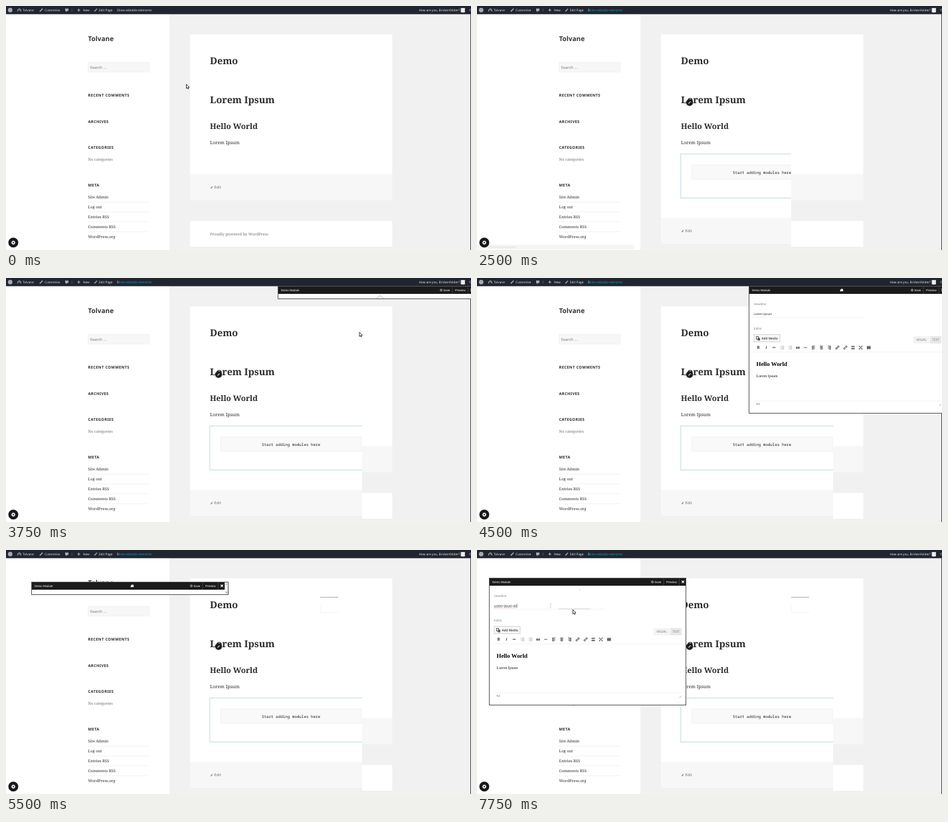
Animation of 700 by 369 pixels, one loop 8000 ms. Source, as an HTML page with a canvas:

```html
<!DOCTYPE html>
<html lang="en">
<head>
<meta charset="utf-8">
<title>Inline module editing</title>
<style>
html, body { margin: 0; width: 100%; height: 100%; overflow: hidden; background: #f1f1f1; }
canvas { display: block; width: 700px; height: 369px; }
</style>
</head>
<body>
<canvas id="stage"></canvas>
<script>
const stage = document.getElementById('stage');
const dpr = window.devicePixelRatio || 1;
stage.width = 700 * dpr;
stage.height = 369 * dpr;
const c = stage.getContext('2d');
c.scale(dpr, dpr);

const SERIF = '"Noto Serif", serif', SANS = '"Noto Sans", sans-serif';
const OPEN = '"Open Sans", sans-serif', ARIAL = '"Liberation Sans", sans-serif';
const TIMES = '"Liberation Serif", serif', MONO = '"Noto Sans Mono", monospace';

function box(x, y, w, h, fill) {
  c.fillStyle = fill;
  c.fillRect(x, y, w, h);
}
function frame(x, y, w, h, color, dash = [], width = 1) {
  c.strokeStyle = color;
  c.lineWidth = width;
  c.setLineDash(dash);
  c.strokeRect(x, y, w, h);
  c.setLineDash([]);
}
function line(points, color, width = 1, dash = []) {
  c.strokeStyle = color;
  c.lineWidth = width;
  c.setLineDash(dash);
  c.beginPath();
  for (let i = 0; i < points.length; i += 2) c.lineTo(points[i], points[i + 1]);
  c.stroke();
  c.setLineDash([]);
}
function poly(points, fill, stroke) {
  c.beginPath();
  for (let i = 0; i < points.length; i += 2) c.lineTo(points[i], points[i + 1]);
  c.closePath();
  c.fillStyle = fill;
  c.fill();
  if (stroke) {
    c.strokeStyle = stroke;
    c.lineWidth = 0.8;
    c.stroke();
  }
}
function dot(x, y, r, fill) {
  c.fillStyle = fill;
  c.beginPath();
  c.arc(x, y, r, 0, 7);
  c.fill();
}
// y is the middle of the capitals
function text(s, x, y, size, font, color, weight = '', align = 'left', gap = 0) {
  c.font = `${weight} ${size}px ${font}`;
  c.textRendering = 'geometricPrecision';
  c.letterSpacing = gap + 'px';
  c.textAlign = align;
  c.fillStyle = color;
  c.fillText(s, x, y + size * 0.36);
}
function pencil(x, y, color, s = 1) {
  line([x - 2 * s, y + 2 * s, x + 2 * s, y - 2 * s], color, 1.5 * s);
}

function toolbar(active) {
  const ink = '#f0f1f3', icon = '#a5a9b0';
  const label = (s, x) => text(s, x, 6.2, 4.74, OPEN, ink);
  box(0, 0, 700, 12.4, '#21252f');
  dot(6.3, 6.2, 3.4, icon);
  c.strokeStyle = icon;
  c.lineWidth = 1.2;
  c.beginPath();
  c.arc(20, 7, 2.4, 2.6, 6.8);
  c.stroke();
  line([20, 7.5, 21.5, 5], icon, 0.8);
  label('Tolvane', 25);
  pencil(53, 6.2, icon, 1.1);
  label('Customise', 58);
  box(89, 3.8, 5, 3.8, icon);
  poly([90, 7, 92.5, 7, 90, 9.3], icon);
  text('0', 98, 6.2, 4.74, OPEN, '#777d82');
  line([107.3, 6.2, 111.7, 6.2], icon, 1.1);
  line([109.5, 4, 109.5, 8.4], icon, 1.1);
  label('New', 116);
  pencil(135, 6.2, icon);
  label('Edit Page', 140);
  text('Show editable elements', 167, 6.2, 4.74, OPEN, active ? '#12a5ca' : ink);
  if (active) text('S', 167, 6.2, 4.74, OPEN, ink);
  text('How are you, Brickenfolder?', 683, 6.2, 4.74, OPEN, ink, '', 'right');
  box(684.5, 3, 6.5, 6.5, '#d5d7d9');
  dot(687.7, 5.2, 1.4, '#fff');
  box(685.5, 7.2, 4.5, 2.3, '#fff');
  line([699.5, 4, 697.5, 6, 699.5, 8], icon, 0.9);
}

function sidebar() {
  box(0, 12, 246, 357, '#fff');
  text('Tolvane', 123.5, 49, 10, SANS, '#333', 'bold');
  box(123.5, 85, 92, 15, '#f7f7f7');
  frame(123.5, 85.5, 92, 14.5, '#e0e0e0', [1, 1], 0.6);
  text('Search …', 126.5, 92.7, 5.83, SANS, '#777');
  const heads = { 'RECENT COMMENTS': 135.3, ARCHIVES: 174.7, CATEGORIES: 214.2, META: 271.3 };
  for (const h in heads) text(h, 123.5, heads[h], 5.83, SANS, '#2c2c2c', 'bold', 'left', 0.32);
  text('No categories', 123.5, 232, 5.8, SERIF, '#707070');
  ['Site Admin', 'Log out', 'Entries RSS', 'Comments RSS', 'WordPress.org'].forEach((s, i) => {
    text(s, 123.5, 289.2 + i * 14.95, 5.87, SERIF, '#2c2c2c');
    if (i) line([123.5, 281.6 + i * 14.95, 215.5, 281.6 + i * 14.95], '#dedede', 0.6, [2, 1]);
  });
}

function footer(y) {
  box(277, y, 304.5, 39, '#f7f7f7');
  line([277, y, 581.5, y], '#ececec', 0.6, [2, 1]);
  pencil(309.6, y + 19.5, '#707070', 0.7);
  text('Edit', 313.5, y + 19.3, 5.7, SANS, '#707070');
}

function article() {
  box(246, 12, 454, 357, '#f1f1f1');
  box(277, 43, 304.5, 212, '#fff');
  footer(255);
  box(277, 325, 304.5, 39, '#fff');
  text('Proudly powered by WordPress', 307, 344.7, 5.83, SERIF, '#707070');
  text('Demo', 307, 82.6, 14.35, SERIF, '#2c2c2c', 'bold');
  text('Lorem Ipsum', 307, 142, 14.35, SERIF, '#2c2c2c', 'bold');
  text('Hello World', 307, 182, 11.75, SERIF, '#2c2c2c', 'bold');
  text('Lorem Ipsum', 307, 206.6, 6.95, SERIF, '#2c2c2c');
}

// the editable layout, painted only as far as x = edge
function editable(edge) {
  c.save();
  c.beginPath();
  c.rect(246, 214, edge - 246, 155);
  c.clip();
  box(246, 214, 454, 155, '#f1f1f1');
  box(277, 214, 304.5, 108, '#fff');
  frame(306.8, 223.8, 244, 66.5, '#74b4bd', [1.4, 0.9], 0.8);
  box(323.5, 240.5, 212, 21.5, '#f9f9f9');
  frame(323.5, 240.5, 211.5, 21.5, '#dcdcdc', [1, 1], 0.7);
  text('Start adding modules here', 429, 251.4, 5.88, MONO, '#222', '', 'center');
  footer(321);
  c.restore();
  c.save();
  c.shadowColor = '#0006';
  c.shadowBlur = 3;
  dot(320, 146, 5, '#1c1c1c');
  c.restore();
  pencil(320, 146, '#ddd', 0.8);
}

function gear() {
  dot(11, 357.8, 7.5, '#191919');
  for (let i = 0; i < 8; i++) {
    const a = i * Math.PI / 4;
    line([11, 357.8, 11 + 3.1 * Math.cos(a), 357.8 + 3.1 * Math.sin(a)], '#fff', 1.2);
  }
  dot(11, 357.8, 2.3, '#fff');
  dot(11, 357.8, 1.1, '#191919');
}

function header(bar) {
  const d = bar ? -5 : 0;
  box(0, 0, 296 + d, 11.5, '#1b1b1b');
  text('Demo Module', 4.5, 5.8, 4.4, ARIAL, '#fff');
  c.strokeStyle = '#fff';
  c.lineWidth = 0.7;
  c.beginPath();
  c.arc(245.5 + d, 5.8, 1.4, 0, 7);
  c.stroke();
  text('Save', 248.8 + d, 5.8, 4.4, ARIAL, '#fff');
  text('Preview', 266.5 + d, 5.8, 4.4, ARIAL, '#fff');
  for (const x of [262.5, 286]) line([x + d, 0, x + d, 11.5], '#555', 0.6);
  line([289.8 + d, 4, 293.2 + d, 7.4], '#fff', 1.1);
  line([293.2 + d, 4, 289.8 + d, 7.4], '#fff', 1.1);
}

function icons(y) {
  const ink = '#444', bar = (x, w, dy, col = ink) => box(x - w / 2, y + dy - 0.45, w, 0.9, col);
  text('B', 14, y, 6, OPEN, ink, 'bold', 'center');
  text('I', 26, y, 6, TIMES, ink, 'italic bold', 'center');
  bar(37.5, 5, 0);
  bar(37.5, 3, -1, '#999');
  for (const x of [50, 62]) for (const dy of [-2, 0, 2]) {
    bar(x + 1, 3.4, dy, '#aaa');
    bar(x - 2, 1, dy, '#aaa');
  }
  for (const x of [72, 75]) {
    dot(x, y + 0.6, 1.2, ink);
    line([x - 0.8, y + 0.6, x + 0.6, y - 2], ink, 0.9);
  }
  bar(85, 4.5, 0);
  [97, 109, 121].forEach((x, i) => [-2.2, -0.7, 0.8, 2.3].forEach((dy, j) => {
    const w = j % 2 ? 3.2 : 5;
    bar(x + (i - 1) * (5 - w) / 2, w, dy);
  }));
  for (const x of [133, 145]) {
    line([x - 1, y + 1, x + 1, y - 1], ink, 0.9);
    for (const s of [-1, 1]) {
      c.beginPath();
      c.arc(x + s * 1.4, y - s * 1.4, 1.2, 0, 7);
      c.stroke();
    }
  }
  line([143, y - 2, 147, y + 2], '#fff', 0.8);
  bar(156.5, 5, -2);
  bar(156.5, 5, -1.2);
  bar(156.5, 5, 2);
  bar(156.5, 5, 1.2);
  for (const s of [-1, 1]) {
    line([165.8, y - s * 2.3, 170.2, y + s * 2.3], ink, 0.9);
    dot(168 + s * 2, y - 2, 0.8, ink);
    dot(168 + s * 2, y + 2, 0.8, ink);
  }
  box(177.5, y - 2.5, 5.5, 5, '#888');
  line([177.5, y, 183, y], ink, 3, [1, 0.7]);
}

function form(typed, caret) {
  const rule = (x, y, w) => line([x, y, x + w, y], '#d8d8d8', 0.6, [1, 1]);
  text('Headline', 7, 26.5, 4.74, ARIAL, '#888');
  text('Lorem Ipsum' + typed, 7, 41.7, 4.74, ARIAL, '#333');
  if (caret) {
    const end = 7 + c.measureText('Lorem Ipsum' + typed).width;
    line([end + 0.5, 39, end + 0.5, 44.5], '#333', 0.6);
    line([7, 44.6, 20.5, 44.6], '#e04848', 0.8, [1, 0.5]);
    line([22.5, 44.6, 35, 44.6], '#e04848', 0.8, [1, 0.5]);
    if (typed.length > 1) line([36.5, 44.6, end, 44.6], '#e04848', 0.8, [1, 0.5]);
  }
  rule(7, 47, 168);
  text('Editor', 7, 63.5, 4.74, ARIAL, '#888');
  box(7, 73, 40, 11, '#f7f7f7');
  frame(7.5, 73, 39, 11, '#ccc', [], 0.8);
  frame(11, 76, 3, 4, '#555', [], 0.9);
  box(13, 78, 3.5, 4, '#555');
  text('Add Media', 19, 78.7, 4.74, OPEN, '#333', '600');
  box(247.5, 75.5, 24.5, 11, '#f3f3f3');
  box(272.5, 75.5, 17, 11, '#e8e8e8');
  text('VISUAL', 259.5, 80.8, 4.74, OPEN, '#666', '', 'center');
  text('TEXT', 281.2, 80.8, 4.74, OPEN, '#777', '', 'center');
  icons(92.7);
  rule(7, 99.5, 283);
  text('Hello World', 11, 117.3, 8.9, TIMES, '#000', 'bold');
  text('Lorem Ipsum', 11, 135.6, 5.95, TIMES, '#111');
  rule(7, 173.5, 283);
  text('h2', 11, 177.6, 4.4, OPEN, '#444');
  line([286, 181, 289, 178], '#999', 0.6);
  line([287.7, 181, 289, 179.7], '#999', 0.6);
}

// x, y name the pixel of the top left corner
function panel(x, y, open, bar, typed, caret) {
  const h = open ? 192 : 19;
  c.save();
  c.translate(x + 0.5, y + 0.5);
  box(0, 0, 296, h, '#fff');
  header(bar);
  if (open) form(typed, caret);
  else if (bar) {
    box(291, 0, 5, h, '#f1f1f1');
    poly([292.3, 3.5, 294.7, 3.5, 293.5, 2], '#666');
    poly([292.3, 15, 294.7, 15, 293.5, 16.5], '#444');
  } else line([148.5, 18.5, 154, 14, 159.5, 18.5], '#aaa', 0.8);
  frame(0, 0, 296, h, '#555');
  c.restore();
}

const shapes = {
  arrow: [0, 0, 0, 6.4, 1.4, 5.1, 2.4, 7.2, 3.5, 6.7, 2.6, 4.7, 4.5, 4.7],
  hand: [-1, -3, 0.3, -3, 0.4, -0.4, 2.6, 0, 3, 1.2, 2.4, 4, -1, 4, -2.8, 1, -1, 1.2],
  grab: [-2.6, 0, -1.6, -0.8, -1, -2, 1.2, -2, 2.4, -1, 2.8, 2.4, -2.2, 2.4, -3, 1.2]
};
function pointer(kind, x, y) {
  if (kind === 'beam') {
    line([x - 1.5, y - 3.5, x, y - 3, x, y + 3, x - 1.5, y + 3.5], '#333', 0.7);
    line([x + 1.5, y - 3.5, x, y - 3, x, y + 3, x + 1.5, y + 3.5], '#333', 0.7);
    return;
  }
  poly(shapes[kind].map((v, i) => v + (i % 2 ? y : x)), '#fff', '#111');
}

// [first step, shape, x, y]
const moves = [
  [0, 'arrow', 271.5, 118.3], [2, 'arrow', 300, 129], [3, 'arrow', 336, 145], [4, 'arrow', 316, 117],
  [5, 'arrow', 268, 72], [6, 'arrow', 222, 27], [7, 'hand', 207.5, 9], [9, 'arrow', 268, 80],
  [10, null], [12, 'arrow', 532, 82], [18, 'grab', 549, 18], [19, 'grab', 470, 45],
  [20, 'grab', 340.5, 82], [21, 'grab', 316, 76], [22, 'grab', 190, 54], [23, 'grab', 171, 48],
  [25, 'arrow', 154, 57], [26, 'beam', 111.5, 84], [29, 'arrow', 144.3, 90.3]
];
// [first step, x, y, open, scrollbar]
const places = [
  [13, 409, 12, false, false], [17, 409, 12, true, false], [19, 334, 36, false, true],
  [20, 204, 71, false, true], [21, 176, 66, false, true], [22, 38, 48, false, true],
  [23, 18, 42, true, false]
];
const latest = (list, k) => list.filter(e => e[0] <= k).pop();

function draw(now) {
  const k = Math.floor((now % 8000) / 250);
  article();
  sidebar();
  if (k >= 8) editable(k < 12 ? 473 : 536);
  if (k >= 10 && k < 12) {
    box(1, 361, 236, 7, '#f5f5f5');
    text('demo.local/wp-admin', 18, 365, 4, OPEN, '#d5d5d5');
    line([331, 138.5, 333.5, 141, 332, 142], '#888', 0.6);
  }
  gear();
  toolbar(k >= 7);
  box(699, 12, 1, 357, '#444');
  if (k === 7) box(226, 29, 0.7, 3, '#999');
  if (k >= 21) {
    box(473, 71, 27, 1, '#aaa');
    line([473.5, 80, 473.5, 94.5, 501, 94.5], '#f1f1f1', 0.8);
  }
  const at = latest(places, k);
  if (at) panel(...at.slice(1), ' do'.slice(0, Math.max(0, k - 27)), k >= 27);
  if (k >= 26) {
    line([122, 89, 170, 89], '#bbb', 0.6);
    box(154, 59, 0.7, 2, '#bbb');
  }
  if (k >= 29) line([112, 81, 110.5, 81, 110.5, 87, 112, 87], '#999', 0.6, [1.5, 1]);
  const [, kind, x, y] = latest(moves, k);
  if (kind) pointer(kind, x, y);
}

function tick() {
  draw(performance.now());
  requestAnimationFrame(tick);
}
tick();
</script>
</body>
</html>
```
